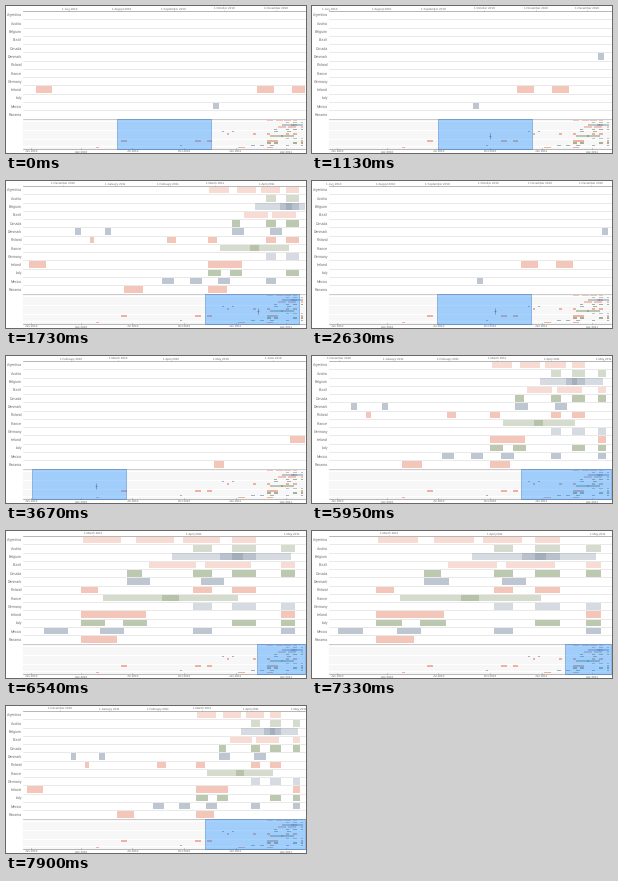
A matplotlib script for the animation above (7.99 s loop, 300 by 147 pixels).

```python
import math
import numpy as np
import matplotlib.pyplot as plt
from matplotlib.animation import FuncAnimation
from matplotlib.collections import LineCollection, PolyCollection
from matplotlib.colors import to_rgba
from matplotlib.patches import Rectangle

W, H, DPI = 300, 147, 100
LOOP, FRAMES = 7990, 170
STEP = LOOP / FRAMES

LEFT, RIGHT = 17, 299
TOP, LANE_H = 5, 8.27
MINI_TOP, MINI_H = 113.2, 2.27
SPAN = 94  # brush width while it is dragged
NEW_YEAR, DAY_PX = 25.0, 0.5604

plt.rcParams["font.family"] = "Liberation Sans"
plt.rcParams["text.hinting"] = "none"

RED, GREEN, SLATE = "#e98368", "#6f8754", "#73849b"
LIGHT, DEEP = 0.29, 0.46

# Name, colour, strength, usual stay, key starts on the overview axis.
LANES = [
    ("Argentina", RED, LIGHT, 6.5, [260.9, 270, 278]),
    ("Austria", GREEN, LIGHT, 4, []),
    ("Belgium", SLATE, LIGHT, 12.1, [276.2, 284.5]),
    ("Brazil", RED, LIGHT, 8, [272.3, 281.8]),
    ("Canada", GREEN, DEEP, 2.7, [268.4]),
    ("Denmark", SLATE, DEEP, 4, [216, 226, 268.4, 281.1]),
    ("Finland", RED, DEEP, 3, [221, 246.7, 260.5]),
    ("France", GREEN, LIGHT, 13, [264.4, 274.5]),
    ("Germany", SLATE, LIGHT, 4, []),
    ("Ireland", RED, DEEP, 11.2, [115.2, 189, 200.7, 260.5]),
    ("Italy", GREEN, DEEP, 4.2, [260.5, 267.7]),
    ("Mexico", SLATE, DEEP, 4, [174.3, 245, 254.3, 263.9]),
    ("Panama", RED, DEEP, 6.3, [90, 232.3, 260.5]),
]

# Rounds that several lanes share: start, length, lanes.
ROUNDS = [
    (279.8, 3.2, "Austria Canada Finland Germany Mexico"),
    (286.5, 4.1, "Argentina Austria Belgium Canada Finland Germany Italy"),
    (294.9, 2.4, "Austria Brazil Canada Germany Ireland Italy Mexico"),
]

MONTHS = ("January February March April May June July August "
          "September October November December").split()


def month_starts():
    days = 0
    for i in range(17):
        m = i % 12
        yield NEW_YEAR + days * DAY_PX, MONTHS[m], 2010 + i // 12
        days += 28 if m == 1 else 31 - m % 7 % 2


def lane_spans(name, stay, starts):
    """Stays before 2011 are half as long; shared rounds follow."""
    year_end = NEW_YEAR + 365 * DAY_PX
    spans = [(x, x + stay * (0.5 if x < year_end else 1)) for x in starts]
    spans += [(x, x + length) for x, length, who in ROUNDS if name in who]
    return spans


def box(x0, x1, y0, y1):
    return [(x0, y0), (x1, y0), (x1, y1), (x0, y1)]


def glide(t, keys):
    """Cosine easing through (time, value) keys."""
    if t <= keys[0][0]:
        return keys[0][1]
    for (t0, a), (t1, b) in zip(keys, keys[1:]):
        if t < t1:
            u = (t - t0) / (t1 - t0)
            return a + (b - a) * (1 - math.cos(math.pi * u)) / 2
    return keys[-1][1]


BRUSH = [(890, 111), (1880, 205), (3490, 17), (4890, 205), (5740, 205),
         (7000, 268), (8000, 198)]
POINTER_X = [(890, 162), (1880, 258), (3490, 81), (4890, 260), (4950, 260),
             (5150, 213), (5300, 213), (5470, 206)]
POINTER_Y = [(100, 151), (440, 130), (4800, 130), (4980, 128)]


def brush_at(t):
    lo = glide(t, BRUSH)
    return lo, (lo + SPAN if t < 5600 else RIGHT)


fig = plt.figure(figsize=(W / DPI, H / DPI), dpi=DPI, facecolor="white")
ax = fig.add_axes([0, 0, 1, 1])
ax.set_xlim(0, W)
ax.set_ylim(H, 0)
ax.axis("off")


def label(x, y, s, px, ha="center"):
    return ax.text(x, y, s, fontsize=px * 72 / DPI, ha=ha,
                   va="center_baseline", color="#6c6c6c")


def rule(y, color, width=0.4):
    ax.plot([LEFT, RIGHT], [y, y], color=color, lw=width, zorder=1)


bars, bar_colors, mini, mini_colors = [], [], [], []
for i, (name, color, strength, stay, starts) in enumerate(LANES):
    y = TOP + i * LANE_H
    my = MINI_TOP + i * MINI_H
    label(15.8, y + LANE_H / 2, name, 3.55, "right")
    rule(y + LANE_H, "#d9d9d9")
    rule(my + MINI_H / 2, "#dcdcdc", 0.3)
    for a, b in lane_spans(name, stay, starts):
        bars.append((a, b, y + 0.9, y + LANE_H - 0.8))
        bar_colors.append(to_rgba(color, strength))
        mini.append(box(a, b, my + 0.4, my + MINI_H - 0.4))
        mini_colors.append(to_rgba(color, strength + 0.15))

rule(TOP, "#999999", 0.5)
rule(MINI_TOP - 0.4, "#b4b4b4")
rule(143, "#999999", 0.5)
ax.add_collection(PolyCollection(mini, facecolors=mini_colors, lw=0, zorder=2))

ticks = []
for i, (x, month, year) in enumerate(month_starts()):
    ticks.append((x, label(x, 1.8, f"1 {month} {year}", 3.05)))
    if i % 3 == 0:
        label(x, 145.3, f"{month[:3]} {year}", 3.05)
        ax.plot([x, x], [142, 143], color="#999999", lw=0.4)

main = PolyCollection([], facecolors=bar_colors, lw=0, zorder=2)
ax.add_collection(main)
marks = LineCollection([], colors="#999999", linewidths=0.4)
ax.add_collection(marks)

brush = Rectangle((0, MINI_TOP - 0.2), 1, 29.8, facecolor=(0.12, 0.56, 1, 0.4),
                  edgecolor=(0.2, 0.42, 0.75, 0.7), lw=0.4, zorder=3)
ax.add_patch(brush)
pointer = LineCollection([], colors="#2b3546", linewidths=0.4, alpha=0.6,
                         zorder=4)
ax.add_collection(pointer)


def pointer_lines(t):
    x, y = glide(t, POINTER_X), glide(t, POINTER_Y)
    if t < 5600:
        return [[(x, y - 2.8), (x, y + 2.8)], [(x - 1, y), (x + 1, y)]]
    if t < 5770:
        return [[(x - 3.5, y), (x + 3.5, y)]]
    return []


def draw(n):
    t = (n + 0.5) * STEP
    lo, hi = brush_at(t)
    zoom = (RIGHT - LEFT) / (hi - lo)

    def to_main(x):
        return LEFT + (x - lo) * zoom

    brush.set_x(lo)
    brush.set_width(hi - lo)
    main.set_verts([box(*np.clip([to_main(a), to_main(b)], LEFT, RIGHT), y0, y1)
                    for a, b, y0, y1 in bars])

    segments = []
    for x, text in ticks:
        shown = lo <= x <= hi
        text.set_visible(shown)
        if shown:
            text.set_x(to_main(x))
            segments.append([(to_main(x), TOP - 1), (to_main(x), TOP)])
    marks.set_segments(segments)
    pointer.set_segments(pointer_lines(t))
    return []


anim = FuncAnimation(fig, draw, frames=FRAMES, interval=STEP, repeat=True,
                     repeat_delay=0, init_func=lambda: draw(0), blit=False)
plt.show()
```
